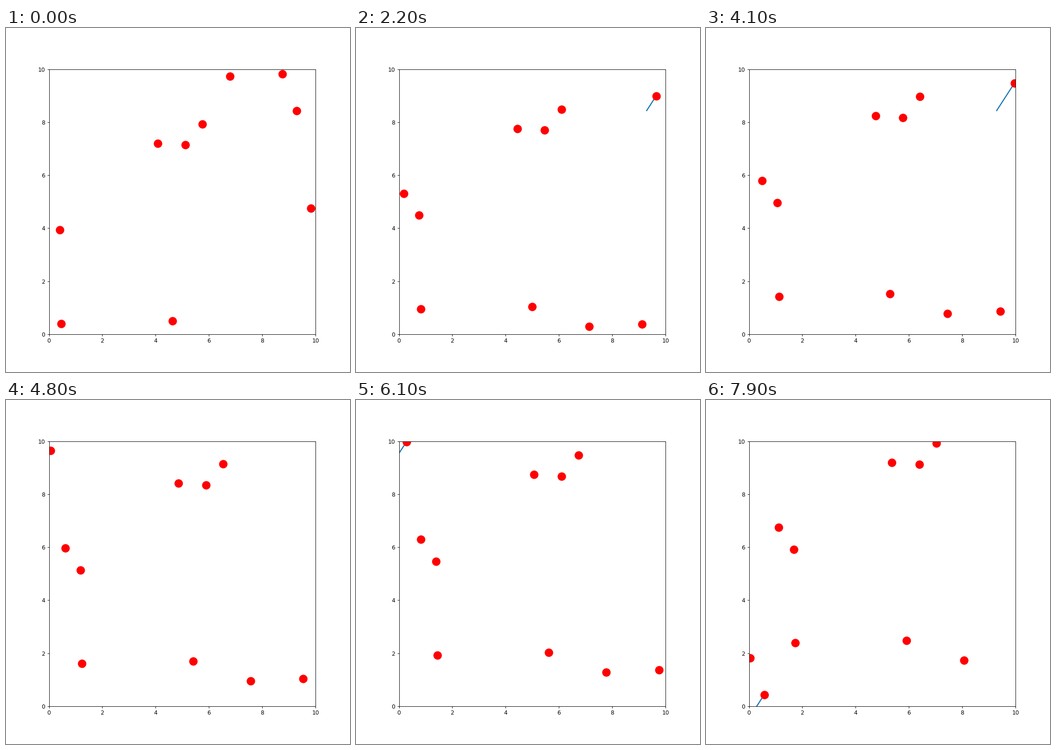
A matplotlib script that plays this animation: 748x748 px, repeating every 8 s.

```python
import numpy as np
import matplotlib.pyplot as plt
from matplotlib.animation import FuncAnimation

SIZE = 10.0
FRAMES = 80
SPEED, HEADING = 0.03, 1.0
TRACKED = 8

# Starting points of the flock; everything else follows from the heading.
xs = [0.40, 0.46, 4.63, 4.08, 5.11, 5.75, 6.78, 8.76, 9.29, 9.83]
ys = [3.93, 0.39, 0.49, 7.20, 7.14, 7.93, 9.74, 9.82, 8.44, 4.755]
start = np.column_stack([xs, ys])
velocity = SPEED * np.array([np.cos(HEADING), np.sin(HEADING)])

fig, ax = plt.subplots(figsize=(8.5, 8.5), dpi=88)
ax.set_xlim(0, SIZE)
ax.set_ylim(0, SIZE)
trail, = ax.plot([], [], linewidth=2)
dots, = ax.plot([], [], "ro", markersize=14)


def trail_points(step):
    """Path of the tracked particle since it last crossed a border."""
    steps = np.arange(step + 1)[:, None]
    path = start[TRACKED] + steps * velocity
    cell = path // SIZE
    same = (cell == cell[-1]).all(axis=1)
    return path[same] % SIZE


def update(step):
    dots.set_data(*((start + step * velocity) % SIZE).T)
    trail.set_data(*trail_points(step).T)
    return trail, dots


anim = FuncAnimation(fig, update, frames=FRAMES, interval=100,
                     repeat=True, repeat_delay=0)
plt.show()
```
